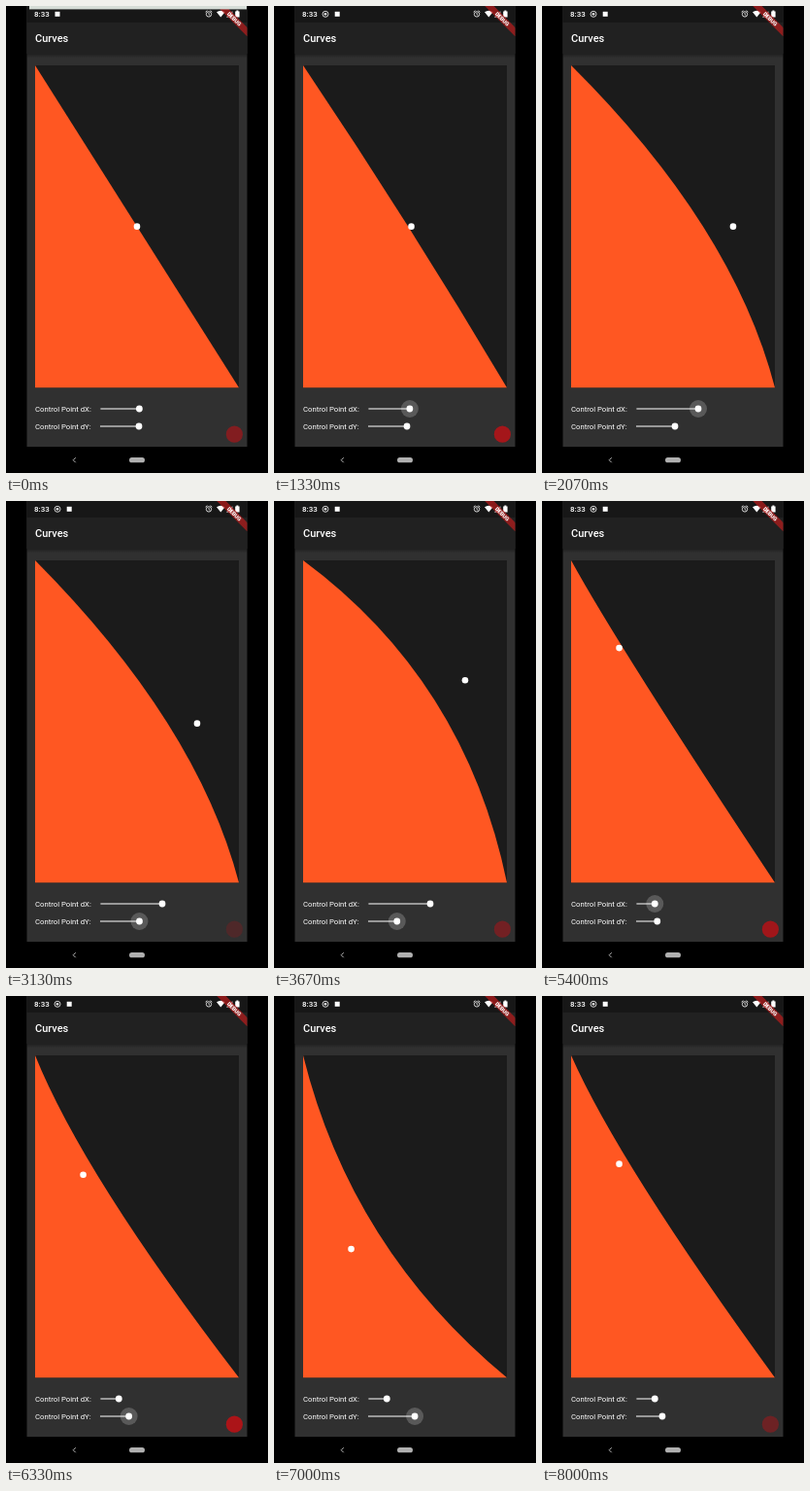
These frames come from a looping animation (270x480 px, 8.07 s). An HTML page:

```html
<!DOCTYPE html>
<html lang="en">
<head>
<meta charset="utf-8">
<title>Curves</title>
<style>
  html, body { margin: 0; width: 100%; height: 100%; overflow: hidden; background: #000; }
  svg { display: block; width: 100vw; height: 100vh; }
  text { font-family: Roboto, "Open Sans", sans-serif; fill: #fff; }
</style>
</head>
<body>
<svg viewBox="0 0 270 480">
  <defs>
    <clipPath id="screen"><rect x="21.5" width="227" height="453"/></clipPath>
    <linearGradient id="shade" x2="0" y2="1">
      <stop stop-color="#000" stop-opacity=".35"/>
      <stop offset="1" stop-color="#000" stop-opacity="0"/>
    </linearGradient>
  </defs>
  <rect width="270" height="480"/>

  <g clip-path="url(#screen)">
    <rect x="21" width="228" height="453" fill="#303030"/>
    <rect x="21" width="228" height="49" fill="#212121"/>
    <rect x="21" width="228" height="17" fill="#171717"/>
    <rect x="21" y="49" width="228" height="4.5" fill="url(#shade)"/>
    <text x="30" y="36.6" font-size="11.04" font-weight="500">Curves</text>

    <rect x="30" y="61" width="210" height="331.3" fill="#1b1b1b"/>
    <path id="area" fill="#ff5722"/>
    <circle id="handle" r="3.3" fill="#fff"/>

    <text x="30" y="416.7" font-size="7.73">Control Point dX:</text>
    <text x="30" y="434.6" font-size="7.73">Control Point dY:</text>
    <g id="sliders"></g>
    <circle id="button" cx="235.4" cy="440.2" r="8.6" fill="#ab1418"/>

    <!-- status bar -->
    <text x="29" y="11" font-size="8" font-weight="500">8:33</text>
    <g id="record">
      <circle cx="53" cy="8.3" r="3" fill="none" stroke="#fff" stroke-width=".8"/>
      <circle cx="53" cy="8.3" r="1.3" fill="#fff"/>
    </g>
    <rect id="badge" y="5.8" width="5" height="5" fill="#fff"/>
    <g fill="none" stroke="#fff" stroke-width=".8">
      <circle cx="209" cy="8.4" r="2.7"/>
      <path d="M209 6.8V8.6L210.2 9.3M205.6 6.2L207.4 4.7M212.4 6.2L210.6 4.7"/>
    </g>
    <g fill="#fff">
      <path d="M221.3 11.6L217 6.2Q221.3 3.2 225.6 6.2Z"/>
      <path d="M227 11.5H233.3V5.2Z"/>
      <path d="M236.2 5.4H237.4V4.6H239.4V5.4H240.6V11.6H236.2Z"/>
    </g>
    <g transform="translate(248.5 0) rotate(45)">
      <rect x="-22.1" y="15.5" width="44.2" height="6.6" fill="#b71c1c" fill-opacity=".72"/>
      <text y="20.8" font-size="5.6" font-weight="900" text-anchor="middle">DEBUG</text>
    </g>
    <rect id="sheet" x="24" width="224" height="3.4" fill="#d5dcd6"/>
  </g>

  <path d="M71.7 464.2L69.2 466.7L71.7 469.2" fill="none" stroke="#b8b8b8" stroke-width="1"/>
  <rect x="127" y="464" width="16" height="5.3" rx="2.65" fill="#b0b0b0"/>
</svg>
<script>
const LOOP = 8070;
const BOX = { x: 30, y: 61, w: 210, h: 331.3 };
const $ = id => document.getElementById(id);
const set = (el, attrs) => { for (const k in attrs) el.setAttribute(k, attrs[k]); };
const clamp = v => Math.min(1, Math.max(0, v));
const smooth = v => { v = clamp(v); return v * v * (3 - 2 * v); };

// [time, value] pairs, eased between neighbours
const dragX = [[1150, .5], [2050, .795], [4830, .795], [5400, .236]];
const dragY = [[2900, .5], [3130, .506], [4150, .26], [4250, .26], [4550, .272],
               [6050, .272], [6850, .62], [7000, .601], [7500, .337]];

function track(keys, t) {
  let value = keys[0][1];
  for (let i = 1; i < keys.length; i++) {
    const [t0, a] = keys[i - 1], [t1, b] = keys[i];
    if (t >= t0) value = a + (b - a) * smooth((t - t0) / (t1 - t0));
  }
  return value;
}

const touchX = [[1070, 2350], [4790, 5500]];
const touchY = [[2850, 4500], [6000, 7550]];
const press = (spans, t) => spans.reduce((p, [down, up]) =>
  Math.max(p, Math.min(smooth((t - down) / 130), 1 - smooth((t - up) / 130))), 0);

// The button pulses: dark, fade in, hold, fade out
function pulse(t) {
  const period = 1235, fade = 400, dark = 200;
  const p = (t - 790 + period * 2) % period;
  return Math.min(smooth((p - dark) / fade), smooth((period - p) / fade));
}

function makeSlider(x, y) {
  const add = (tag, attrs) => {
    const el = document.createElementNS($("sliders").namespaceURI, tag);
    set(el, attrs);
    return $("sliders").appendChild(el);
  };
  const halo = add("circle", { cy: y, fill: "#fff", "fill-opacity": .2 });
  const line = add("line", { x1: x, y1: y, y2: y, stroke: "#fff", "stroke-width": 1.2 });
  const thumb = add("circle", { cy: y, r: 3.4, fill: "#fff" });
  return (value, pressed) => {
    const pos = x + 80 * value;
    set(line, { x2: pos });
    set(thumb, { cx: pos });
    set(halo, { cx: pos, r: 9 * pressed });
  };
}
const sliderX = makeSlider(97.4, 414);
const sliderY = makeSlider(97, 432);

function draw(t) {
  const dx = track(dragX, t), dy = track(dragY, t);
  const cx = BOX.x + BOX.w * dx, cy = BOX.y + BOX.h * dy;
  const right = BOX.x + BOX.w, bottom = BOX.y + BOX.h;
  set($("area"), { d: `M${BOX.x} ${BOX.y}Q${cx} ${cy} ${right} ${bottom}H${BOX.x}Z` });
  set($("handle"), { cx, cy });
  sliderX(dx, press(touchX, t));
  sliderY(dy, press(touchY, t));
  set($("button"), { opacity: pulse(t) });

  const opening = t < 70;
  set($("sheet"), { visibility: opening ? "visible" : "hidden" });
  set($("record"), { visibility: opening ? "hidden" : "visible" });
  set($("badge"), { x: opening ? 50.5 : 62.7 });
}

const start = performance.now();
function tick() {
  draw((performance.now() - start) % LOOP);
  requestAnimationFrame(tick);
}
tick();
</script>
</body>
</html>
```
